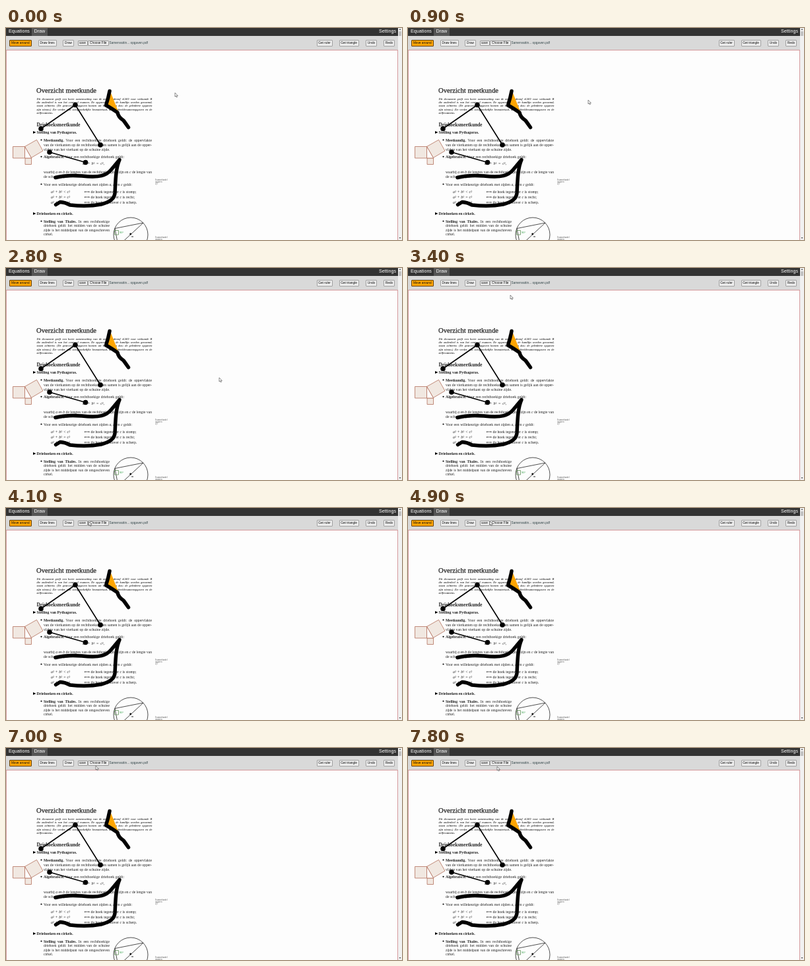
An HTML page that plays this animation: 600x321 px, repeating every 8 s.

```html
<!DOCTYPE html>
<html lang="nl">
<meta charset="utf-8">
<style>
  html, body { margin: 0; width: 100%; height: 100%; overflow: hidden; background: #fdfdfd; }
  #stage { position: absolute; left: 0; top: 0; width: 600px; height: 321px; overflow: hidden; }
  #stage > * { position: absolute; box-sizing: border-box; white-space: nowrap; }
  .text { line-height: 10px; color: #222; font-family: "Liberation Serif", serif; }
  #stage > .line { text-align: justify; text-align-last: justify; white-space: normal; }
  .ui { font-family: "Liberation Sans", sans-serif; }
  .title { -webkit-text-stroke: .25px #222; }
  .intro { font-weight: bold; font-style: italic; color: #444; }
  .head { font-weight: bold; }
  .note { color: #555; }
  .button { height: 10px; top: 18px; font: 4.75px/8.6px "Liberation Sans", sans-serif; text-align: center;
    color: #111; background: #eee; border: .7px solid #a0a0a0; border-radius: 1px; }
  .active { background: #ffa500; border-color: #654208; }
  .file { top: 19px; height: 8px; line-height: 6.6px; border-color: #999; }
  #bar { width: 600px; height: 12px; background: #333; }
  #tab { left: 39px; width: 24px; height: 12px; background: #555; }
  #tools { top: 12px; width: 594px; height: 21px; background: #d9d9d9; }
  #board { top: 33px; width: 594px; height: 288px; border: 1px solid #d49a9c; border-bottom: 0; }
  #scroll { left: 594px; width: 6px; height: 321px; background: #f1f1f1; }
</style>
<div id="stage">
  <div id="bar"></div><div id="tab"></div><div id="tools"></div><div id="board"></div><div id="scroll"></div>
</div>
<script>
const stage = document.getElementById('stage');

function add(className, style, html) {
  const el = document.createElement('div');
  el.className = className;
  Object.assign(el.style, style);
  el.innerHTML = html;
  stage.append(el);
}

// y is the middle of the line; a width justifies it
function text(x, y, size, html, className = '', width) {
  add(`text ${className} ${width ? 'line' : ''}`, {
    left: x + 'px', top: y - 5 + 'px', fontSize: size + 'px', width: width ? width + 'px' : 'auto'
  }, html);
}

function button(x, width, label, className = '') {
  add('button ' + className, { left: x + 'px', width: width + 'px' }, label);
}

for (const [x, label] of [[4, 'Equations'], [42.5, 'Draw'], [565, 'Settings']]) {
  text(x, 4.8, 7.2, `<span style="color:#fff">${label}</span>`, 'ui');
}
button(5, 33.5, 'Move around', 'active');
button(48.5, 28, 'Draw lines');
button(86, 17, 'Draw');
button(108.5, 15, 'save', 'file');
button(124, 31.5, 'Choose File', 'file');
button(470.5, 24, 'Get ruler');
button(504.5, 30, 'Get triangle');
button(545, 17, 'Undo');
button(572, 17, 'Redo');
text(156.5, 22.8, 4.8, '<span style="color:#34474a">Samenvattin... opgaven.pdf</span>', 'ui');

text(46, 94.7, 10.6, 'Overzicht meetkunde', 'title');
[
  'Dit document geeft een korte samenvatting van de meetkundestof vLKO voor wiskunde B',
  'die onderdeel is van het centraal examen. De opgaven die in de kantlijn worden genoemd,',
  'staan achterin. (De gearceerde opgaven komen uit het domein dus; de geleiderte opgaven',
  'zijn nieuw.) Zie verder ook oorspronkelijke lesmateriaal, de voorbeeldexamenopgaven en de'
].forEach((line, i) => text(46.5, 107.5 + i * 5.4, 4.4, line, 'intro', 175));
text(46.5, 129.2, 4.7, 'zelfexamens.', 'intro');

text(46.5, 146.6, 7.3, 'Driehoeksmeetkunde', 'head');
text(46.5, 157.8, 5.9, 'Stelling van Pythagoras.', 'head');
text(46.5, 280.8, 5.8, 'Driehoeken en cirkels.', 'head');

text(57, 169.5, 5.7, '<b>Meetkundig.</b> Voor een rechthoekige driehoek geldt: de oppervlakte', '', 164);
text(57, 176.8, 5.7, 'van de vierkanten op de rechthoekszijden samen is gelijk aan de opper-', '', 164);
text(57, 183.7, 5.8, 'vlakte van het vierkant op de schuine zijde.');
text(57, 194.8, 5.8, '<b>Algebraïsch.</b> Voor een rechthoekige driehoek geldt:', '', 122);
text(116, 204.5, 5.9, '<i>a</i>² + <i>b</i>² = <i>c</i>²,', '', 33);
text(57, 218.3, 5.6, 'waarbij <i>a</i> en <i>b</i> de lengtes van de rechthoekszijden zijn en <i>c</i> de lengte van', '', 164);
text(57, 225.3, 5.8, 'de schuine zijde.');
text(57, 236.5, 5.7, 'Voor een willekeurige driehoek met zijden <i>a, b</i> en <i>c</i> geldt:', '', 134);
[['&lt;', 'stomp;'], ['=', 'recht;'], ['&gt;', 'scherp.']].forEach(([sign, kind], i) => {
  const y = 248 + i * 8.2;
  text(68, y, 5.9, `<i>a</i>² + <i>b</i>² ${sign} <i>c</i>²`, '', 29);
  text(118.5, y, 5.9, '⟺');
  text(128.5, y, 5.8, `de hoek tegenover <i>c</i> is ${kind}`);
});
text(57, 292.5, 5.6, '<b>Stelling van Thales.</b> In een rechthoekige', '', 100);
text(57, 299.2, 5.6, 'driehoek geldt: het midden van de schuine', '', 100);
text(57, 305.8, 5.4, 'zijde is het middelpunt van de omgeschreven', '', 100);
text(57, 312.2, 5.6, 'cirkel.');
for (const y of [229.5, 316.5]) {
  ['Examenbundel', 'opgaven', '4,5'].forEach((note, i) => text(226, y + i * 3.3, 3.1, note, 'note'));
}

const bullet = y => `<circle cx="53.5" cy="${y}" r="1.1"/>`;
const arrow = y => `<path d="M41 ${y - 2}l4.5 2-4.5 2z"/>`;
const knot = ([x, y]) => `<circle cx="${x}" cy="${y}" r="3.8"/>`;
const chain = points =>
  `<polyline points="${points.join(' ')}" fill="none" stroke="#000" stroke-width="1.6"/>` + points.map(knot).join('');

stage.insertAdjacentHTML('beforeend', `
<svg width="600" height="321" style="left:0;top:0">
  <path d="M595.500 3l1.500-2 1.500 2zM595.500 317l1.500 2 1.500-2z" fill="#555"/>
  <path d="M595 5h4v7h-4z" fill="#c1c1c1"/>
  ${[169.5, 194.8, 236.5, 292.5].map(bullet).join('')}
  ${[158, 281].map(arrow).join('')}
  <g fill="#f1e8e1" stroke="#b3705c" stroke-width=".8">
    <path d="M10.500 179.500H28.500V197H10.500zM28.500 179.500L46.500 169.300 56 186 38.300 196.500zM29 197H38.500V206.500H29z"/>
    <path d="M28.500 179.500V197H38.500z" fill="#fff"/>
  </g>
  <g fill="none" stroke="#222" stroke-width=".8">
    <circle cx="189" cy="313" r="26"/>
    <path d="M165 303.500L208 295 170 330z"/>
    <path d="M164.500 306.500h6v6.500h-6z" stroke="#63925a"/>
  </g>
  <circle cx="188.700" cy="312" r="1.400"/>
  <g font-family="Liberation Serif, serif" font-size="4.500">
    <text x="172" y="311" fill="#32a047">90°</text>
    <text x="190" y="317" font-style="italic">m</text>
  </g>
  ${chain([[53, 152.5], [105, 116.5], [143, 177]])}
  ${chain([[66, 188], [120.5, 203.5]])}
  <path d="M158 96L170 126 151 117z" fill="#ffa500"/>
  <g fill="none" stroke="#000" stroke-width="5.500" stroke-linecap="round" stroke-linejoin="round">
    <path d="M157 95.500Q155 106 151.500 117Q159 121 169 128Q170 135 178 140Q181 144 185.500 150.500"/>
    <path d="M75 226.500C88 223 102 223 115 224C143 227 152 223 159 215L172 199.500C166 213 166 232 165 250C164 259 158 263 144 267Q123 271 97 268Q90 264 82 263.500L75.500 267.500"/>
  </g>
  <path id="cursor" d="M0 0V6L1.400 4.800 2.400 7 3.400 6.500 2.500 4.600H4.400z"
    fill="#fff" stroke="#444" stroke-width=".6" stroke-linejoin="round"/>
</svg>`);

// time, x, y
const path = [
  [0, 256, 98], [700, 272, 108], [900, 273, 109], [1300, 287, 107], [2700, 287, 107],
  [2800, 323, 166], [2900, 323, 166], [3400, 155, 41], [3800, 126, 21], [4900, 124, 20],
  [5200, 114, 23], [5500, 114, 23], [5700, 136, 27], [7600, 136, 27], [7700, 135, 28], [8000, 135, 28]
];
const cursor = document.getElementById('cursor');

function draw(now) {
  const t = Math.floor(now % 8000 / 100) * 100;
  const i = path.findIndex(p => p[0] > t);
  const [t0, x0, y0] = path[i - 1], [t1, x1, y1] = path[i];
  const k = (t - t0) / (t1 - t0);
  cursor.setAttribute('transform', `translate(${x0 + (x1 - x0) * k} ${y0 + (y1 - y0) * k})`);
  requestAnimationFrame(draw);
}
draw(performance.now());
</script>
</html>
```
